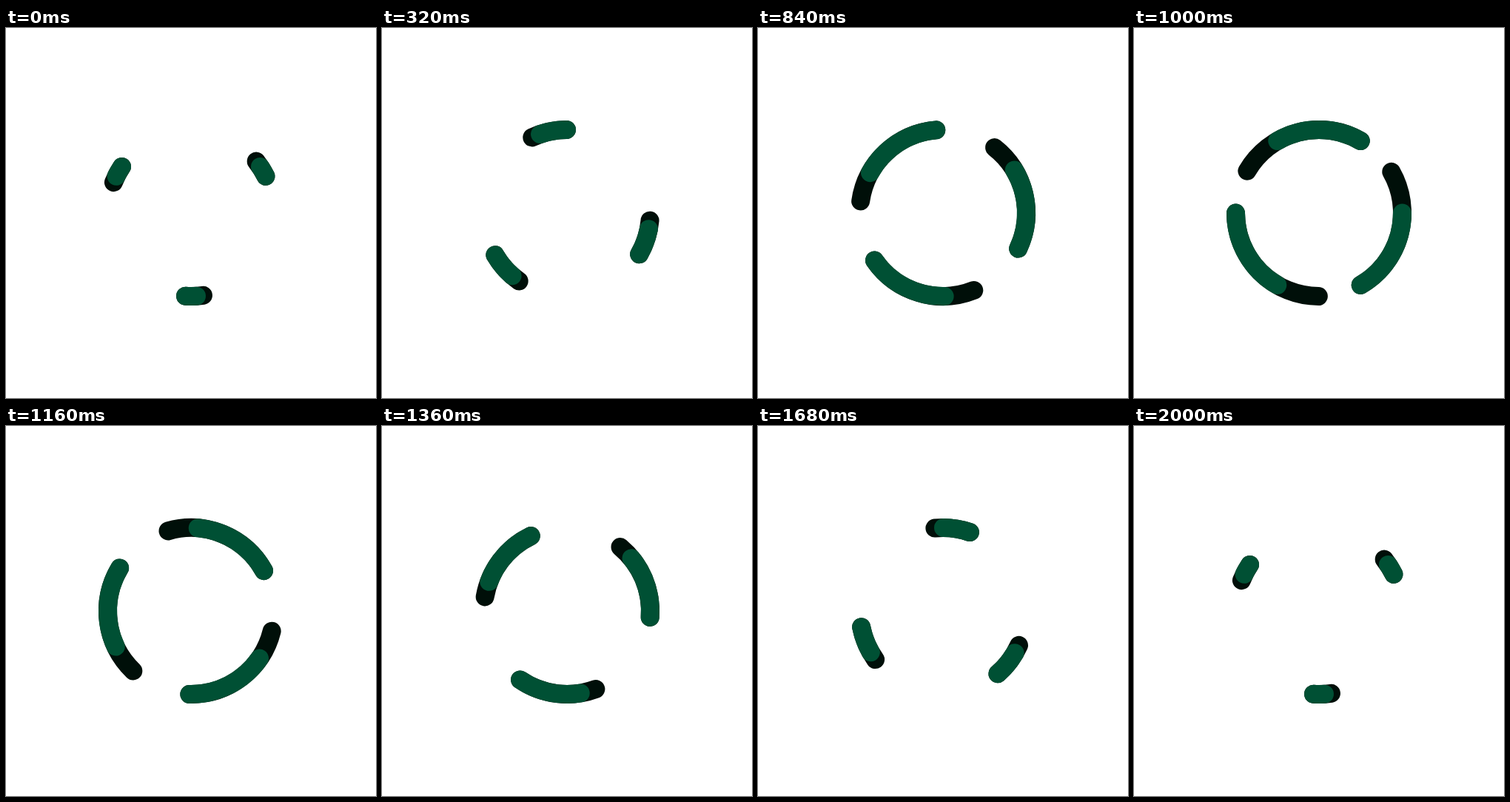
An HTML page for the animation above (2.04 s loop, 500 px wide and 500 px high).

```html
<!DOCTYPE html>
<html lang="en">
<head>
<meta charset="utf-8">
<title>Spinner</title>
<style>
  html, body { margin: 0; width: 100%; height: 100%; overflow: hidden; background: #fff; }
  svg { display: block; width: 100%; height: 100%; }
  path { fill: none; stroke-width: 25; stroke-linecap: round; }
</style>
</head>
<body>
<svg viewBox="0 0 500 500">
  <path id="shade" stroke="#000f09"/>
  <path id="band" stroke="#005034"/>
</svg>
<script>
const CENTER = 250, RADIUS = 112.5;
const STEP = 40, LOOP = 2040, STEPS_PER_TURN = 50;
const shade = document.getElementById('shade');
const band = document.getElementById('band');

function point(deg) {
  const a = deg * Math.PI / 180;
  return (CENTER + RADIUS * Math.cos(a)).toFixed(2) + ' ' +
         (CENTER + RADIUS * Math.sin(a)).toFixed(2);
}

// Three equal arcs, a third of a turn apart
function arcs(from, to) {
  return [0, 120, 240].map(turn =>
    `M${point(from + turn)}A${RADIUS} ${RADIUS} 0 0 1 ${point(to + turn)}`).join('');
}

function draw(time) {
  const phase = Math.floor((time % LOOP) / STEP) / STEPS_PER_TURN;
  const a = phase * 2 * Math.PI;
  const middle = 90 + 360 * phase - 8.5 * Math.sin(a);
  const length = 33.8 - 26.2 * Math.cos(a) + 0.8 * (Math.cos(2 * a) - 1);
  const lag = 1 / (0.1255 + 0.0878 * Math.cos(a) + 0.004 * Math.cos(3 * a));
  const tail = middle - length / 2, head = middle + length / 2;
  shade.setAttribute('d', arcs(tail - lag, head));
  band.setAttribute('d', arcs(tail, head));
}

const start = performance.now();
function tick() {
  draw(performance.now() - start);
  requestAnimationFrame(tick);
}
tick();
</script>
</body>
</html>
```
